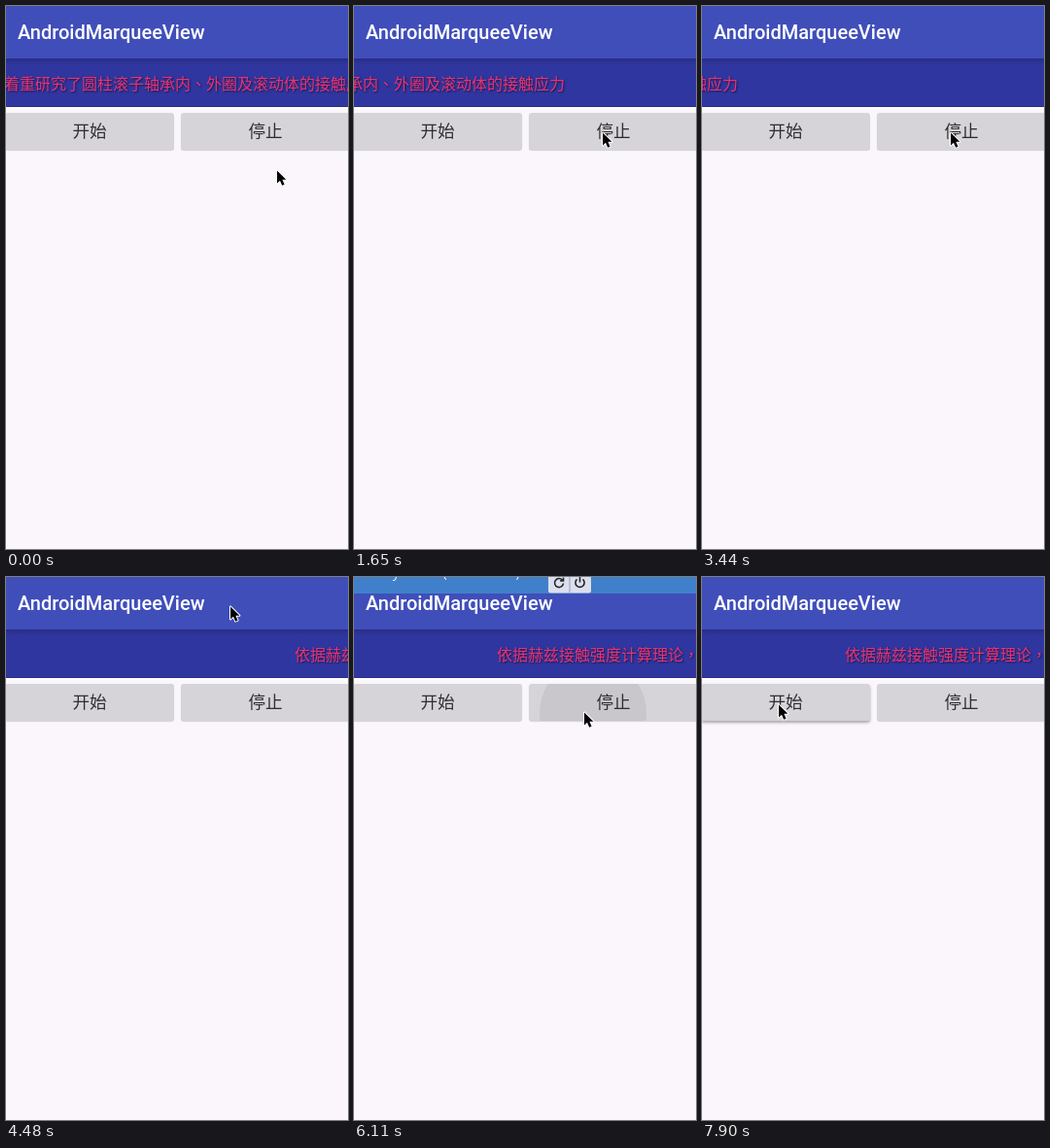
An HTML page for the animation above (8000 ms loop, 352 px wide and 559 px high).

```html
<!DOCTYPE html>
<html lang="zh-Hans">
<head>
<meta charset="utf-8">
<title>AndroidMarqueeView</title>
<style>
html, body { margin: 0; width: 100%; height: 100%; overflow: hidden; background: #faf6fc; }
body, #stage { position: relative; }
#stage { width: 352px; height: 559px; overflow: hidden;
  font-family: "Noto Sans CJK SC", "Noto Sans CJK", sans-serif; }
#stage div, #stage > svg { position: absolute; }
.band { left: 0; top: 54px; width: 352px; height: 50px; overflow: hidden;
  background: linear-gradient(#272c85, #2d3497 4px, #3036a0 9px, #3036a0); }
.band::after { content: ""; position: absolute; inset: 49px 0 0; background: #292e88; }
.edge { left: 0; top: 104px; width: 352px; height: 3px; background: linear-gradient(#fff, #faf6fc); }
.bar { left: 0; top: 0; width: 352px; height: 54px; background: #404eba; }
.title { left: 12px; top: 15px; font: 500 20px/24px Roboto, sans-serif; color: #fff; white-space: pre; }
#marquee { left: 0; top: 13px; font-size: 16px; line-height: 24px; font-weight: 500;
  white-space: pre; color: #ea326e; text-shadow: 1px 1px 2px #14184e; }
#marquee span { font-family: "Noto Sans CJK TC", "Noto Sans CJK", sans-serif; }
.button { top: 110px; width: 174px; height: 38px; border-radius: 3px; overflow: hidden;
  background: #d6d4d9; box-shadow: 0 1px 1px rgba(0,0,0,.16); }
.button.raised { box-shadow: 0 2px 3px rgba(0,0,0,.32); }
.label { inset: 0; font-size: 17.6px; line-height: 36px; text-align: center; color: #2f2e31; }
#ripple { border-radius: 50%; background: #c9c7cc; }
#tools { left: 0; top: 0; width: 352px; height: 17px; overflow: hidden; background: #4080cb; }
#tools div { left: 27px; top: -14px; font: 14px/18px "Open Sans", sans-serif; color: #e9f1fb; white-space: pre; }
#tools svg { position: absolute; left: 200px; top: 0; }
</style>
</head>
<body>
<div id="stage">
  <div class="band"><div id="marquee">依据赫兹接触强度计算理论<span lang="zh-Hant">，</span>着重研究了圆柱滚子轴承内<span lang="zh-Hant">、</span>外圈及滚动体的接触应力</div></div>
  <div class="edge"></div>
  <div class="bar"></div>
  <div class="title">AndroidMarqueeView</div>
  <div class="button" id="start" style="left:-1px"><div class="label">开始</div></div>
  <div class="button" id="stop" style="left:180px"><div id="ripple"></div><div class="label">停止</div></div>
  <div id="tools">
    <div>My tablet (768 x 1280)</div>
    <svg width="44" height="17">
      <path d="M0 0H44V14Q44 16.5 41.500 16.500H2.500Q0 16.500 0 14Z" fill="#dcdfec"/>
      <path d="M22 0V16.500" stroke="#8f9cc0"/>
      <g fill="none" stroke="#25262c" stroke-width="1.600">
        <path d="M14.500 3.200A4.500 4.500 0 1 0 15.500 6.500M15.500 .5V4H12"/>
        <path d="M29.500 2.300A4.600 4.600 0 1 0 35.500 2.300M32.500 0V5.500"/>
      </g>
    </svg>
  </div>
  <svg id="cursor" width="20" height="24" viewBox="-4 -4 20 24" style="left:-4px;top:-4px">
    <path d="M1 1.500V14.500L4 11.700L6.200 16.700L8.600 15.700L6.400 10.700H10.400Z"
      fill="#000" stroke="#fff" stroke-width="2" stroke-linejoin="round" paint-order="stroke"/>
  </svg>
</div>
<script>
const LOOP = 8000;
const STOP = 40, RAISE = 52, TOOLS_ON = 32, TOOLS_OFF = 50;
const shortTicks = [19, 24, 30, 35, 41];
const ticks = [0];
for (let i = 0; i < 53; i++) ticks.push(ticks[i] + (shortTicks.includes(i) ? 140 : 150));

// tick, x, y of the pointer tip
const path = [
  [0, 278, 168], [1, 278, 168], [7, 272, 149], [11, 255, 129], [27, 255, 129],
  [30, 230, 29], [31, 224, 6], [32, 222, 4], [35, 167, 213], [36, 167, 214],
  [37, 180, 204], [39, 236, 138], [42, 236, 138], [45, 172, 211], [48, 170, 212],
  [51, 78, 130], [53, 78, 130]
];
const rippleSteps = { 40: [24, 1], 41: [55, 1], 42: [85, .7], 43: [110, .3] };

const $ = id => document.getElementById(id);
const [marquee, cursor, ripple, start, tools] =
  ["marquee", "cursor", "ripple", "start", "tools"].map($);

function pointerAt(i) {
  const n = Math.max(1, path.findIndex(p => p[0] >= i));
  const [a, ax, ay] = path[n - 1], [b, bx, by] = path[n];
  const k = (i - a) / (b - a);
  return [ax + (bx - ax) * k, ay + (by - ay) * k].map(Math.round);
}

function draw(i) {
  const x = i < 26 ? -210 - 15 * i : 222 + 15 * (35 - Math.min(i, STOP));
  marquee.style.transform = `translateX(${x}px)`;
  const [px, py] = pointerAt(i);
  cursor.style.transform = `translate(${px}px, ${py}px)`;
  const [r, alpha] = rippleSteps[i] || [0, 0];
  Object.assign(ripple.style, {
    left: 65.5 - r + "px", top: 30 - r + "px",
    width: 2 * r + "px", height: 2 * r + "px", opacity: alpha
  });
  start.classList.toggle("raised", i >= RAISE);
  tools.style.display = i >= TOOLS_ON && i < TOOLS_OFF ? "block" : "none";
}

function loop() {
  const t = performance.now() % LOOP;
  draw(ticks.findLastIndex(tick => tick <= t));
  requestAnimationFrame(loop);
}
loop();
</script>
</body>
</html>
```
